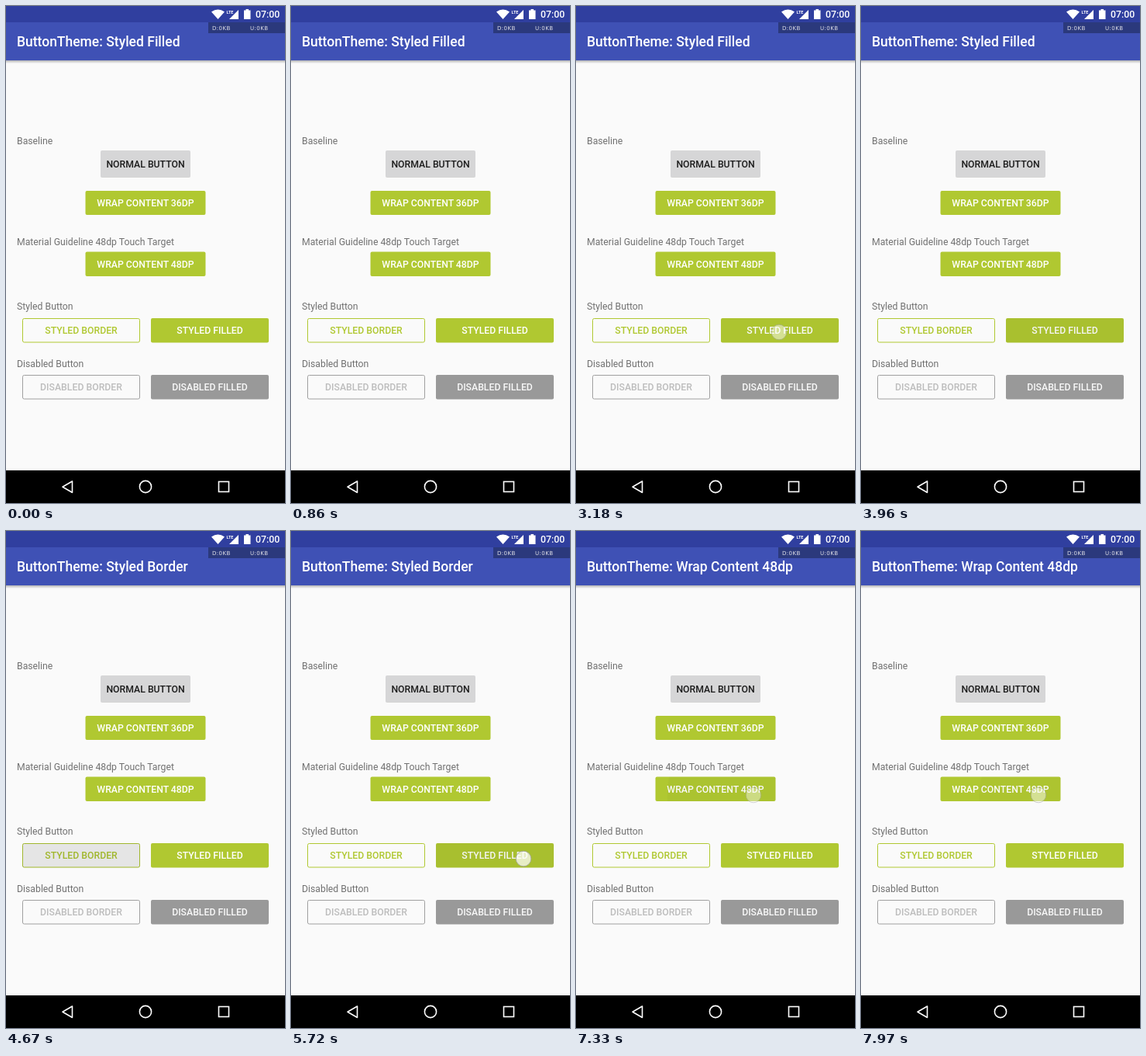
Recreate the animation shown at these times as an HTML page. Size 360x640 px, loop 7.99 s.

```html
<!DOCTYPE html>
<html lang="en">
<head>
<meta charset="utf-8">
<title>Button themes</title>
<style>
  html, body { margin: 0; width: 100%; height: 100%; overflow: hidden; background: #fafafa; }
  svg { display: block; width: 360px; height: 640px; font-family: Roboto, sans-serif; }
  .title { font-size: 17.5px; font-weight: 500; fill: #fff; }
  .label { font-size: 12.25px; fill: #717171; }
  .caps { font-size: 12.25px; font-weight: 500; text-anchor: middle; }
  .clock { font-size: 12.25px; font-weight: 500; fill: #fff; }
  .speed { font: 7px "DejaVu Sans", sans-serif; letter-spacing: .4px; fill: #e4e4ea; }
</style>
</head>
<body>
<svg viewBox="0 0 360 640">
  <defs>
    <linearGradient id="shade" x2="0" y2="1">
      <stop stop-color="#000" stop-opacity=".28"/>
      <stop offset="1" stop-color="#000" stop-opacity="0"/>
    </linearGradient>
  </defs>
  <rect width="360" height="640" fill="#fafafa"/>

  <rect y="70" width="360" height="4" fill="url(#shade)"/>
  <rect width="360" height="70" fill="#3f51b5"/>
  <rect width="360" height="21" fill="#303f9f"/>
  <rect x="261" y="21" width="99" height="14" fill="#2b397c"/>
  <text id="title" class="title" x="14" y="52"></text>

  <g fill="#fff">
    <path d="M265 7.5Q273.500 1.500 282 7.500L273.500 17Z"/>
    <path d="M300 5V17H288Z"/>
    <path d="M307 5.500H309.500V4H313V5.500H315.500V17H307Z"/>
    <text x="284.500" y="10" font-size="5.500" font-weight="700" stroke="#303f9f" stroke-width="1" paint-order="stroke">LTE</text>
  </g>
  <text class="clock" x="322" y="15">07:00</text>
  <text class="speed" x="266" y="31">D:0KB</text>
  <text class="speed" x="315" y="31">U:0KB</text>

  <g id="labels"></g>
  <g id="buttons"></g>
  <g id="ripples"></g>
  <circle id="touch" r="9.800" fill="#fff" fill-opacity=".72" stroke="#a0a0a0" stroke-opacity=".8"/>

  <rect y="598" width="360" height="42"/>
  <g fill="none" stroke="#fff" stroke-width="1.600">
    <path d="M85.500 612V626.500L73 619.200Z" stroke-linejoin="round"/>
    <circle cx="180" cy="619" r="7.600"/>
    <rect x="274.500" y="612.500" width="13" height="13"/>
  </g>
</svg>
<script>
const LOOP = 7990, FADE = 330, LINGER = 90, SHADE = .085;
const $ = id => document.getElementById(id);

function add(parent, name, attrs, text) {
  const node = document.createElementNS('http://www.w3.org/2000/svg', name);
  for (const key in attrs) node.setAttribute(key, attrs[key]);
  if (text) node.textContent = text;
  parent.append(node);
  return node;
}

const labels = [
  ['Baseline', 178], ['Material Guideline 48dp Touch Target', 307.5],
  ['Styled Button', 391], ['Disabled Button', 464.5]
];
for (const [text, y] of labels) add($('labels'), 'text', { class: 'label', x: 14, y }, text);

const LIME = '#b0c831', WHITE = '#fff';
const buttons = {
  normal: { text: 'Normal Button', box: [122, 186, 116, 34], fill: '#d6d6d7', ink: '#1c1c1c' },
  wrap36: { text: 'Wrap Content 36dp', box: [102.5, 238, 155, 31], fill: LIME, ink: WHITE },
  wrap48: { text: 'Wrap Content 48dp', box: [102.5, 316.500, 155, 31.500], fill: LIME, ink: WHITE },
  border: { text: 'Styled Border', box: [21, 402, 152, 31.500], line: LIME, ink: LIME },
  filled: { text: 'Styled Filled', box: [187, 402, 152, 31.500], fill: LIME, ink: WHITE },
  offBorder: { text: 'Disabled Border', box: [21, 475, 152, 31.500], line: '#a0a0a0', ink: '#bdbdbd' },
  offFilled: { text: 'Disabled Filled', box: [187, 475, 152, 31.500], fill: '#999', ink: '#f8f8f8' }
};

for (const key in buttons) {
  const b = buttons[key], [x, y, width, height] = b.box;
  const inset = b.line ? .5 : 0;
  if (key === 'normal') {
    add($('buttons'), 'rect', { x, y: y + 1, width, height, rx: 2, fill: '#000', 'fill-opacity': .15 });
  }
  add($('buttons'), 'rect', {
    x: x + inset, y: y + inset, width: width - 2 * inset, height: height - 2 * inset,
    rx: 2, fill: b.fill || 'none', stroke: b.line || 'none'
  });
  add($('buttons'), 'text', {
    class: 'caps', x: x + width / 2, y: y + height / 2 + 4.500, fill: b.ink
  }, b.text.toUpperCase());
  const clip = add(document.querySelector('defs'), 'clipPath', { id: 'clip-' + key });
  add(clip, 'rect', { x, y, width, height, rx: 2 });
}

// Times in ms: finger down, finger up, ripple gone.
const taps = [
  { on: 'border', x: 154, y: 418, down: 1760, up: 2110, end: 2760 },
  { on: 'filled', x: 262, y: 420, down: 3060, up: 3150, end: 4110 },
  { on: 'border', x: 150, y: 419, down: 4280, up: 4450, end: 5160 },
  { on: 'filled', x: 300, y: 422, down: 5300, up: 6250, end: 6990 },
  { on: 'wrap48', x: 229, y: 340, down: 7140, up: 7290, end: 7900 },
  { on: 'wrap48', x: 229, y: 340, down: 7860, up: 7940, end: 8800 }
];
for (const tap of taps) {
  const group = add($('ripples'), 'g', { 'clip-path': `url(#clip-${tap.on})` });
  tap.node = add(group, 'circle', { cx: tap.x, cy: tap.y, fill: '#000' });
}

const clamp = v => Math.max(0, Math.min(1, v));

// Slow rise while held, quick rise on release, then a fade.
function strength(tap, t) {
  if (t < tap.down || t > tap.end) return 0;
  const held = .6 * clamp((Math.min(t, tap.up) - tap.down) / 500);
  const full = held + (1 - held) * clamp((t - tap.up) / 200);
  return full * clamp((tap.end - t) / FADE);
}

function draw(now) {
  const t = now % LOOP;
  let heading = 'filled', finger = null;
  for (const tap of taps) {
    if (t >= tap.up) heading = tap.on;
    if (t >= tap.down && t < tap.up + LINGER) finger = tap;
    const grow = 1 - (1 - clamp((t - tap.down) / 450)) ** 2;
    tap.node.setAttribute('r', 14 + 146 * grow);
    tap.node.setAttribute('opacity', strength(tap, t) * SHADE);
  }
  const title = 'ButtonTheme: ' + buttons[heading].text;
  if ($('title').textContent !== title) $('title').textContent = title;
  const touch = $('touch');
  touch.setAttribute('opacity', finger ? clamp((finger.up + LINGER - t) / LINGER) : 0);
  if (finger) {
    touch.setAttribute('cx', finger.x);
    touch.setAttribute('cy', finger.y);
  }
}

let start;
function tick(now) {
  start ??= now;
  draw(now - start);
  requestAnimationFrame(tick);
}
draw(0);
requestAnimationFrame(tick);
</script>
</body>
</html>
```
